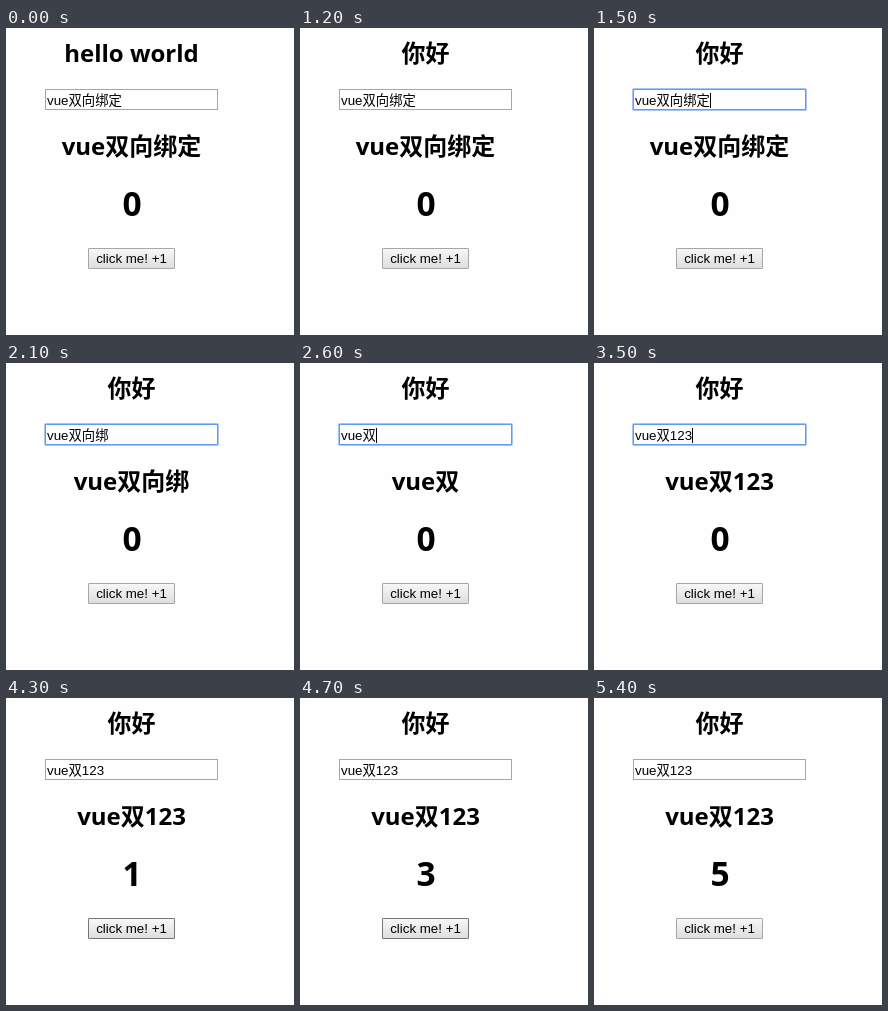
An HTML page for the animation above (6500 ms loop, 288 by 307 pixels).

```html
<!DOCTYPE html>
<html lang="zh-CN">
<head>
<meta charset="utf-8">
<title>Two-way binding</title>
<style>
  html, body { margin: 0; width: 100%; height: 100%; overflow: hidden; background: #fefefe; }
  svg { display: block; width: 288px; height: 307px; }
  text { fill: #000; white-space: pre; }
  .head { font: bold 24px "Open Sans", "Noto Sans CJK SC", "Noto Sans CJK", sans-serif; text-anchor: middle; }
  #count { font-size: 33.5px; }
  .form { font: 13.333px "Liberation Sans", "Noto Sans CJK SC", "Noto Sans CJK", sans-serif; }
  .mid { text-anchor: middle; }
  #button { fill: url(#raised); stroke: #a6a6a6; }
  #button.hover { stroke: #757575; }
  #button.active { fill: url(#pressed); stroke: #757575; }
</style>
</head>
<body>
<svg viewBox="0 0 288 307">
  <defs>
    <linearGradient id="raised" x2="0" y2="1">
      <stop stop-color="#f8f8f8"/><stop offset="1" stop-color="#dddddd"/>
    </linearGradient>
    <linearGradient id="pressed" x2="0" y2="1">
      <stop stop-color="#dddddd"/><stop offset="1" stop-color="#f8f8f8"/>
    </linearGradient>
  </defs>

  <text id="title" class="head" x="125.5" y="34"></text>

  <rect x="39.5" y="61.5" width="172" height="20" fill="#fff" stroke="#a6a6a6"/>
  <g id="ring" fill="none">
    <rect x="38.5" y="60.5" width="174" height="22" rx="1" stroke="#a3c5fb"/>
    <rect x="39.5" y="61.5" width="172" height="20" stroke="#5f9bf5"/>
  </g>
  <text id="field" class="form" x="41" y="77"></text>
  <rect id="caret" y="65" width="1" height="15"/>

  <text id="echo" class="head" x="125.5" y="127"></text>
  <text id="count" class="head" x="126" y="188"></text>

  <rect id="button" x="82.5" y="220.5" width="86" height="20" rx="0.5"/>
  <text class="form mid" x="125.5" y="235">click me! +1</text>
</svg>
<script>
const LOOP = 6500;

// Each step: start time and the values that change there.
const steps = [
  [0, { title: "hello world", value: "vue双向绑定", count: 0, button: "normal", focus: false, caret: false }],
  [1200, { title: "你好" }],
  [1500, { focus: true, caret: true }],
  [2000, { caret: false }],
  [2100, { value: "vue双向绑" }],
  [2300, { value: "vue双向" }],
  [2500, { value: "vue双" }],
  [2600, { caret: true }],
  [3000, { caret: false }],
  [3100, { value: "vue双1", caret: true }],
  [3300, { value: "vue双12" }],
  [3500, { value: "vue双123" }],
  [4000, { caret: false, button: "hover" }],
  [4300, { focus: false, count: 1 }],
  [4500, { count: 2 }],
  [4600, { button: "active" }],
  [4700, { button: "hover", count: 3 }],
  [4800, { button: "active" }],
  [4900, { button: "hover", count: 4 }],
  [5100, { count: 5 }],
  [5400, { button: "normal" }]
];

const el = id => document.getElementById(id);
const setText = (id, value) => { el(id).textContent = value; };
const show = (id, on) => el(id).setAttribute("visibility", on ? "visible" : "hidden");

function render(state) {
  setText("title", state.title);
  setText("field", state.value);
  setText("echo", state.value);
  setText("count", state.count);
  show("ring", state.focus);
  show("caret", state.caret);
  el("caret").setAttribute("x", Math.round(41 + el("field").getComputedTextLength()));
  el("button").setAttribute("class", state.button);
}

const start = performance.now();
let shown = -1;

function tick() {
  const time = (performance.now() - start) % LOOP;
  const past = steps.filter(([at]) => at <= time);
  if (past.length !== shown) {
    shown = past.length;
    render(Object.assign({}, ...past.map(step => step[1])));
  }
  requestAnimationFrame(tick);
}
tick();
</script>
</body>
</html>
```
